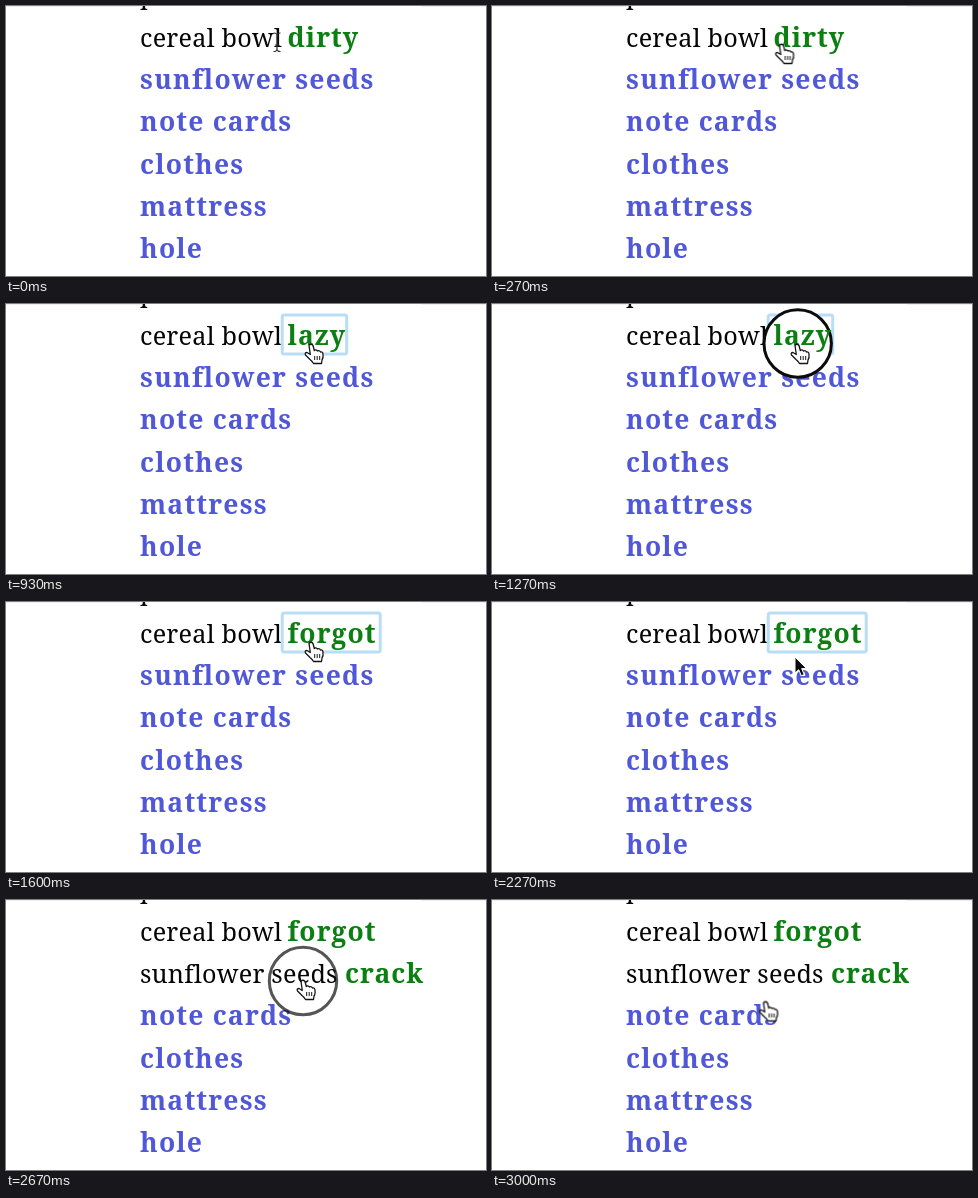
Recreate the animation shown at these times as an HTML page. Size 480 by 270 pixels, loop 3070 ms.

```html
<!DOCTYPE html>
<html lang="en">
<head>
<meta charset="utf-8">
<title>Word list</title>
<style>
html, body { margin: 0; width: 100%; height: 100%; overflow: hidden; background: #fff; }
svg { display: block; width: 100vw; height: 100vh; }
text { font: 25.2px "Noto Serif", Georgia, serif; letter-spacing: .25px; fill: #050505; }
.link, .word { font-weight: 700; font-size: 26.5px; letter-spacing: 1.2px; }
.link { fill: #5058d8; }
.word { fill: #0b7f12; letter-spacing: 1.05px; }
.focus rect { fill: none; stroke: #b8ddf6; stroke-width: 3; }
.ring { fill: #fff; stroke: #0c0c0c; stroke-width: 3; }

/* one 3070 ms loop; every change is a hard cut */
.anim { animation: 3070ms step-end infinite; }
.off { visibility: hidden; }

#dirty { animation-name: dirty; }
#tail { animation-name: tail; }
#lazy { animation-name: lazy; }
#forgot { animation-name: forgot; }
#boxDirty { animation-name: boxDirty; }
#boxLazy { animation-name: lazy; }
#boxForgot { animation-name: boxForgot; }
#seedsLink { animation-name: seedsLink; }
#seedsDone { animation-name: seedsDone; }
#ring1 { animation-name: ring1; }
#ring2 { animation-name: ring2; }
#ring3 { animation-name: ring3; }
#cursor { animation-name: move; }
#beam { animation-name: beam; }
#hand { animation-name: hand; }
#arrow { animation-name: arrow; }

@keyframes dirty { 0% { visibility: visible } 26.05%, 100% { visibility: hidden } }
@keyframes tail { 0% { fill: #0b7f12 } 23.77%, 100% { fill: #55a88c } }
@keyframes lazy { 0% { visibility: hidden } 26.05% { visibility: visible } 43.32%, 100% { visibility: hidden } }
@keyframes forgot { 0% { visibility: hidden } 43.32%, 100% { visibility: visible } }
@keyframes boxDirty { 0% { visibility: hidden } 23.77% { visibility: visible } 26.05%, 100% { visibility: hidden } }
@keyframes boxForgot { 0% { visibility: hidden } 43.32% { visibility: visible } 84.69%, 100% { visibility: hidden } }
@keyframes seedsLink {
  0% { visibility: visible; fill: #5058d8 }
  78.17% { visibility: visible; fill: #18a9f6 }
  86.97%, 100% { visibility: hidden }
}
@keyframes seedsDone { 0% { visibility: hidden } 86.97%, 100% { visibility: visible } }
@keyframes ring1 { 0% { opacity: 0 } 23.77% { opacity: 1 } 26.05% { opacity: .7 } 28.33% { opacity: .3 } 30.29%, 100% { opacity: 0 } }
@keyframes ring2 {
  0% { opacity: 0 } 41.36% { opacity: 1 } 43.32% { opacity: .8 } 45.6% { opacity: .5 }
  47.88% { opacity: .25 } 49.83%, 100% { opacity: 0 }
}
@keyframes ring3 { 0% { opacity: 0 } 84.69% { opacity: 1 } 86.97% { opacity: .7 } 88.92% { opacity: .3 } 91.2%, 100% { opacity: 0 } }

@keyframes move {
  0% { transform: translate(271px, 36px) }
  2.28% { transform: translate(274px, 36px); animation-timing-function: steps(6, end) }
  15.3% { transform: translate(305px, 40px) }
  69.38% { transform: translate(305px, 44px) }
  71.66% { transform: translate(304px, 50px) }
  73.94% { transform: translate(303px, 55px) }
  75.89% { transform: translate(302px, 61px) }
  78.17% { transform: translate(300px, 66px) }
  80.45% { transform: translate(299px, 69px) }
  82.41% { transform: translate(298.5px, 71.5px) }
  84.69% { transform: translate(297px, 80px) }
  91.2% { transform: translate(292px, 85px) }
  93.48% { transform: translate(285px, 91px) }
  95.43% { transform: translate(278px, 97px) }
  97.71%, 100% { transform: translate(273.5px, 101.5px) }
}
@keyframes beam { 0% { visibility: visible } 6%, 100% { visibility: hidden } }
@keyframes hand { 0% { visibility: hidden } 6% { visibility: visible } 73.94% { visibility: hidden } 78.17%, 100% { visibility: visible } }
@keyframes arrow { 0% { visibility: hidden } 73.94% { visibility: visible } 78.17%, 100% { visibility: hidden } }
</style>
</head>
<body>
<svg viewBox="0 0 480 270" preserveAspectRatio="none">
  <path d="M0 .5H134M415 .5H480" stroke="#eee"/>
  <text x="134" y="-2.5">p</text>
  <text x="134" y="40.5">cereal bowl</text>

  <text id="seedsLink" class="link anim" x="134" y="83">sunflower seeds</text>
  <g id="seedsDone" class="anim off">
    <text x="134" y="83">sunflower seeds</text>
    <text class="word" x="339" y="83">crack</text>
  </g>
  <text class="link" x="134" y="125">note cards</text>
  <text class="link" x="134" y="167.5">clothes</text>
  <text class="link" x="134" y="210">mattress</text>
  <text class="link" x="134" y="252">hole</text>

  <g class="focus">
    <rect id="boxDirty" class="anim off" x="276.2" y="11" width="79" height="39" rx="2"/>
    <rect id="boxLazy" class="anim off" x="276.2" y="11" width="64.5" height="39" rx="2"/>
    <rect id="boxForgot" class="anim off" x="276.2" y="11" width="98" height="39" rx="2"/>
  </g>

  <circle id="ring1" class="ring anim" cx="305.7" cy="39.5" r="33.7"/>
  <circle id="ring2" class="ring anim" cx="305.7" cy="39.5" r="33.7"/>

  <text id="dirty" class="word anim" x="281.5" y="40.7">dirt<tspan id="tail" class="anim">y</tspan></text>
  <text id="lazy" class="word anim off" x="281.5" y="40.7">lazy</text>
  <text id="forgot" class="word anim off" x="281.5" y="40.7">forgot</text>

  <circle id="ring3" class="ring anim" style="fill: none" cx="297" cy="81" r="33.7"/>

  <g id="cursor" class="anim">
    <path id="beam" class="anim" d="M-3.5 -9Q0 -9 0 -6.5Q0 -9 3.5 -9M0 -6.5V7M-2 3H2M-3.5 9.5Q0 9.5 0 7Q0 9.5 3.5 9.5" fill="none" stroke="#333" stroke-width="1.2"/>
    <g id="hand" class="anim off" stroke="#151515" stroke-width="1.3" stroke-linejoin="round">
      <path d="M-2 1.5Q0 -1 2 1.5L3.3 6.5Q5 5 6.5 7Q8.5 6 9.5 8Q12 7.5 12 10.5Q12.5 14 11 16L10.5 19.5H2.5Q1 17 -1 15.5L-5.5 11Q-6.5 8.5 -4 8.5L-.7 10.5Z" fill="#fff"/>
      <path d="M3.7 12V16M6.2 12V16M8.7 12V16" stroke-width="1"/>
    </g>
    <path id="arrow" class="anim off" d="M0 0V16L3.7 12.7L6.3 18.8L9.2 17.5L6.7 11.6H11.5Z" fill="#0a0a0a" stroke="#fff" stroke-width="1"/>
  </g>
</svg>
</body>
</html>
```
